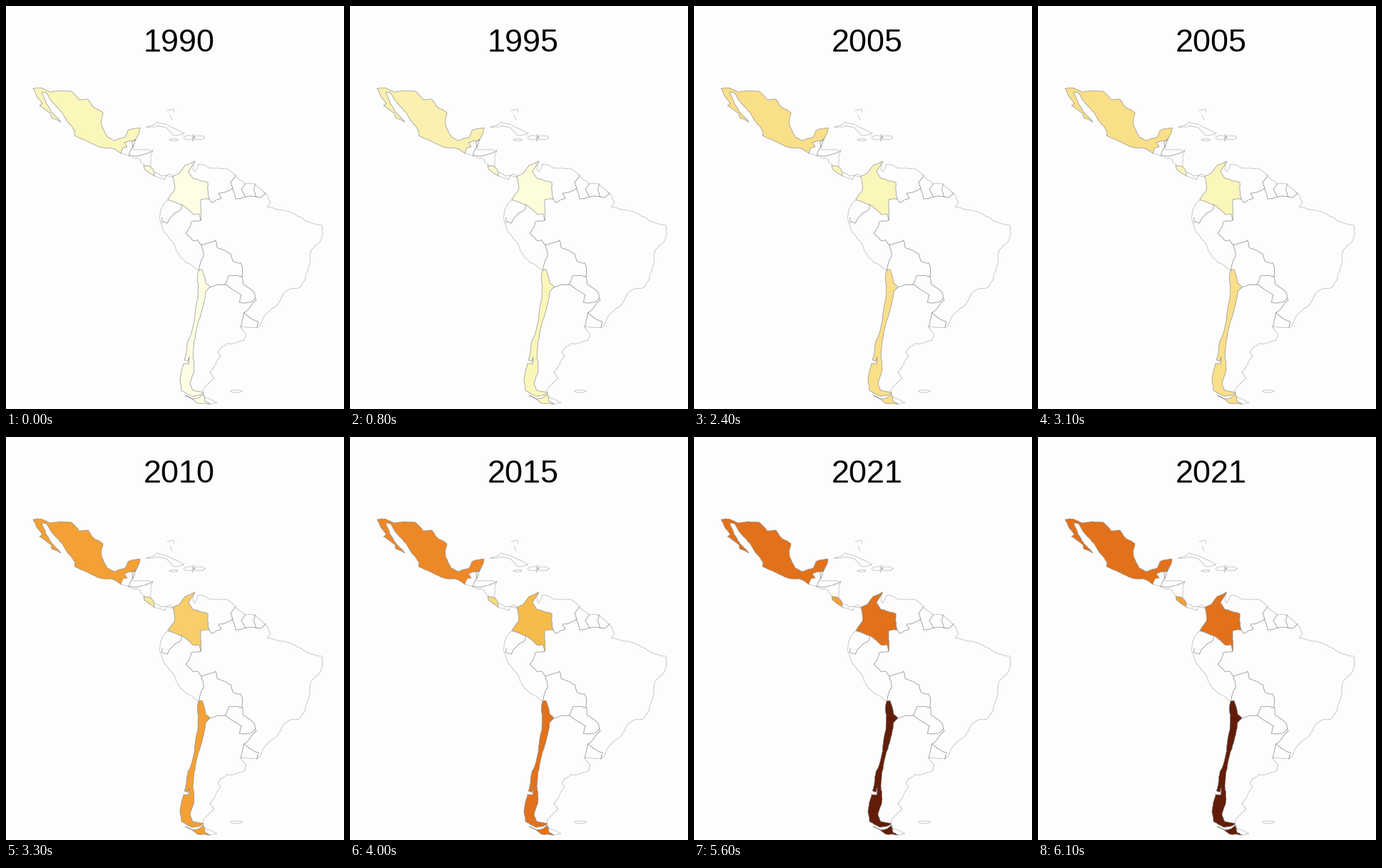
Animation, 474 px wide and 566 px high, one loop 6400 ms. Source, as a matplotlib script:

```python
import numpy as np
import matplotlib.pyplot as plt
from matplotlib.animation import FuncAnimation
from matplotlib.colors import LinearSegmentedColormap

W, H, DPI = 474, 566, 64
FRAMES, INTERVAL, HOLD = 64, 100, 8
PAPER, COAST, BORDER = "#fdfdfd", "#b4b4b4", "#858585"

YEARS = [*range(1990, 2021, 5), 2021]
SHADES = ["#fdfee4", "#fcfbd0", "#fbf6ba", "#f9eaa4", "#fadf89", "#f7ce69",
          "#f6bb4a", "#f3a035", "#ed8828", "#e2711b", "#af3a04", "#621d08"]
RAMP = LinearSegmentedColormap.from_list("levels", SHADES, N=1024)

# Position on the shade ramp for each year
LEVELS = {
    "mexico": [2, 2.5, 3, 4, 7, 8, 9, 9],
    "costa rica": [0.5, 1, 1.5, 2, 3.5, 4.3, 7, 7],
    "colombia": [0, 0.5, 1, 2, 5, 6, 8, 9],
    "chile": [0, 2, 3, 4, 7, 9, 10, 11],
}

rng = np.random.RandomState(4)
fig = plt.figure(figsize=(W / DPI, H / DPI), dpi=DPI, facecolor=PAPER)
ax = fig.add_axes([0, 0, 1, 1])
ax.set(xlim=(0, W), ylim=(H, 0))
ax.axis("off")
lands = {name: [] for name in LEVELS}


def px(size):
    return size * 72 / DPI


def rough(xy, amount=0.09, depth=3):
    """Split every segment repeatedly, nudging the midpoints sideways."""
    points = np.reshape(xy, (-1, 2)).astype(float)
    for _ in range(depth):
        step = np.diff(points, axis=0)
        nudge = rng.uniform(-amount, amount, (len(step), 1))
        middle = points[:-1] + step / 2 + nudge * step[:, ::-1] * [1, -1]
        points = np.insert(points, range(1, len(points)), middle, axis=0)
    return points


def line(color, xy):
    ax.plot(*rough(xy).T, color=color, lw=px(0.7), snap=False, zorder=2)


def coast(*xy):
    line(COAST, xy)


def border(*xy):
    line(BORDER, xy)


def island(x, y, rx, ry):
    turn = np.linspace(0, 2 * np.pi, 9)
    line(COAST, np.column_stack([x + rx * np.cos(turn), y + ry * np.sin(turn)]))


def land(name, *xy):
    shape = plt.Polygon(rough(xy + xy[:2], 0.06), ec="#919191", lw=px(0.7),
                        snap=False, zorder=1)
    lands[name].append(ax.add_patch(shape))


# Coloured countries
land("mexico",
     38, 116, 50, 115, 62, 121, 92, 120, 103, 132, 115, 131, 124, 143,
     136, 150, 134, 167, 142, 184, 152, 189, 167, 184, 171, 175, 188, 171,
     182, 188, 166, 192, 170, 198, 164, 199, 161, 207, 147, 199, 128, 197,
     96, 182, 97, 176, 79, 150, 57, 122, 50, 121, 65, 150, 77, 163,
     64, 157, 63, 151, 47, 140, 51, 137)
land("costa rica", 193, 224, 203, 226, 208, 233, 208, 239, 194, 229)
land("colombia",
     265, 218, 256, 232, 262, 242, 283, 248, 285, 271, 273, 272, 273, 301,
     271, 292, 262, 292, 248, 280, 227, 272, 236, 259, 234, 239, 244, 234,
     251, 224)
land("chile",
     270, 371, 275, 370, 280, 389, 286, 395, 280, 401, 276, 422, 270, 442,
     262, 490, 264, 508, 258, 530, 262, 540, 277, 543, 270, 547, 260, 548,
     246, 540, 244, 526, 249, 502, 256, 503, 257, 493, 255, 499, 250, 497,
     255, 470, 266, 424)
land("chile", 251, 547, 262, 552, 271, 550, 277, 545, 279, 555, 286, 559,
     269, 558)

# Central America
border(177, 190, 177, 200, 172, 210)
border(178, 190, 182, 187, 177, 200)
border(172, 210, 183, 211, 190, 209, 206, 203)
coast(161, 207, 178, 213, 187, 214, 195, 225)
coast(178, 202, 206, 203, 203, 226)
coast(208, 233, 218, 239, 231, 236, 235, 241, 225, 238, 222, 244, 208, 239)

# Islands
coast(197, 170, 212, 163, 250, 179, 234, 181, 225, 171, 197, 170)
coast(226, 147, 235, 145, 236, 149)
coast(230, 153, 233, 160)
border(263, 180, 262, 190)
island(235, 188, 6, 1.5)
island(257, 185, 8, 3)
island(271, 185, 8, 3)
island(323, 541, 8, 1.8)

# Venezuela and the Guianas
coast(265, 218, 262, 230, 265, 233, 270, 222, 284, 227, 309, 228, 322, 238,
      335, 250, 349, 250, 362, 262)
border(285, 271, 288, 276, 302, 270, 298, 263, 318, 256, 315, 248, 322, 238)
border(318, 256, 322, 271, 336, 268, 330, 258, 335, 250)
border(336, 268, 351, 268, 348, 260, 349, 250)
border(351, 268, 359, 268, 364, 262)

# Atlantic coast and Uruguay
coast(362, 262, 371, 276, 366, 282, 398, 289, 443, 308, 442, 328, 427, 346,
      423, 372, 413, 395, 391, 402, 377, 423, 352, 452, 329, 451)
border(334, 431, 354, 443, 352, 452)
border(329, 451, 334, 431)
coast(329, 451, 337, 461, 334, 469, 310, 474, 297, 486, 301, 491, 286, 514,
      292, 522, 276, 539, 277, 543)
coast(277, 545, 281, 551, 296, 557, 286, 559)

# Andes and the interior
coast(227, 272, 220, 280, 216, 301, 239, 344, 270, 371)
border(246, 279, 245, 286, 226, 305, 219, 303, 219, 297)
border(273, 301, 260, 303, 252, 319, 263, 330, 269, 329, 274, 336)
border(274, 336, 277, 351, 271, 371)
border(274, 336, 294, 329, 296, 339, 316, 349, 318, 358, 329, 361, 331, 380)
border(331, 380, 312, 379, 307, 391, 286, 395)
border(307, 391, 330, 406, 327, 416, 343, 416, 349, 411)
border(331, 380, 333, 391, 349, 403, 351, 413, 334, 431)

title = ax.text(242.3, 64.5, "", ha="center", va="baseline", color="black",
                family="Liberation Sans", size=px(45))


def update(frame):
    step = frame // HOLD
    title.set_text(str(YEARS[step]))
    for name, shapes in lands.items():
        for shape in shapes:
            shape.set_facecolor(RAMP(LEVELS[name][step] / (len(SHADES) - 1)))
    return [title]


anim = FuncAnimation(fig, update, frames=FRAMES, interval=INTERVAL,
                     repeat=True, repeat_delay=0)
plt.show()
```
